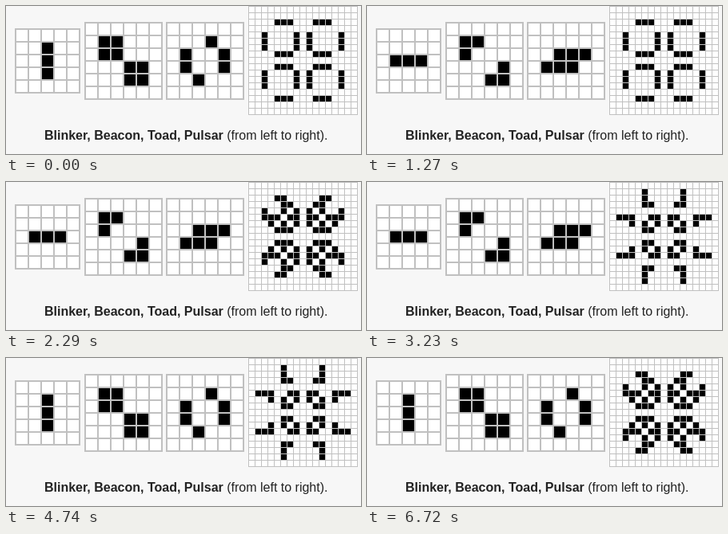
Recreate the animation shown at these times as an HTML page with a canvas. Size 444 by 186 pixels, loop 6870 ms.

```html
<!DOCTYPE html>
<html lang="en">
<head>
<meta charset="utf-8">
<title>Oscillators</title>
<style>
  html, body { margin: 0; width: 100%; height: 100%; overflow: hidden; background: #f7f7f7; }
  canvas { position: absolute; left: 0; top: 0; }
  p {
    position: absolute; left: 48px; top: 154px; margin: 0; white-space: nowrap;
    font: 16px/17px "Liberation Sans", Arial, sans-serif; color: #222;
  }
</style>
</head>
<body>
<canvas id="stage" width="444" height="186"></canvas>
<p><b>Blinker, Beacon, Toad, Pulsar</b> (from left to right).</p>
<script>
const ctx = document.getElementById('stage').getContext('2d');
const LOOP = 6870;
const STEPS = [280, 710, 1270, 1700, 2290, 2820, 3230, 3780, 4190, 4740, 5180, 5760, 6160, 6720];

const inBar = v => [4, 5, 6, 10, 11, 12].includes(v);
const onRail = v => [2, 7, 9, 14].includes(v);
const among = (...cells) => (x, y) => cells.includes(x + ',' + y);

// x, y, cells per side, pitch, line width, starting pattern
const boards = [
  [11, 28, 5, 16, 2, (x, y) => x === 2 && y > 0 && y < 4],
  [98, 20, 6, 16, 2, (x, y) => x > 0 && x < 5 && y > 0 && y < 5 && (x < 3) === (y < 3)],
  [200, 20, 6, 16, 2, among('3,1', '1,2', '1,3', '4,2', '4,3', '2,4')],
  [303, 0, 17, 8, 1, (x, y) => inBar(x) && onRail(y) || inBar(y) && onRail(x)]
].map(([x, y, n, pitch, line, seed]) => {
  const states = [makeGrid(n, seed)];
  for (let i = 0; i < STEPS.length; i++) states.push(evolve(states[i]));
  return { x, y, n, pitch, line, states };
});

function makeGrid(n, rule) {
  return Array.from({ length: n }, (_, y) => Array.from({ length: n }, (_, x) => rule(x, y)));
}

function evolve(grid) {
  return makeGrid(grid.length, (x, y) => {
    let near = 0;
    for (let dy = -1; dy <= 1; dy++)
      for (let dx = -1; dx <= 1; dx++)
        if ((dx || dy) && grid[y + dy]?.[x + dx]) near++;
    return near === 3 || near === 2 && grid[y][x];
  });
}

function drawBoard({ x, y, n, pitch, line, states }, gen) {
  const side = n * pitch + line;
  ctx.fillStyle = '#c0c0c0';
  ctx.fillRect(x, y, side, side);
  states[gen].forEach((row, r) => row.forEach((alive, c) => {
    ctx.fillStyle = alive ? '#000' : '#fff';
    ctx.fillRect(x + line + c * pitch, y + line + r * pitch, pitch - line, pitch - line);
  }));
}

const start = performance.now();
function frame() {
  const t = (performance.now() - start) % LOOP;
  const gen = STEPS.filter(s => s <= t).length;
  boards.forEach(b => drawBoard(b, gen));
  requestAnimationFrame(frame);
}
frame();
</script>
</body>
</html>
```
